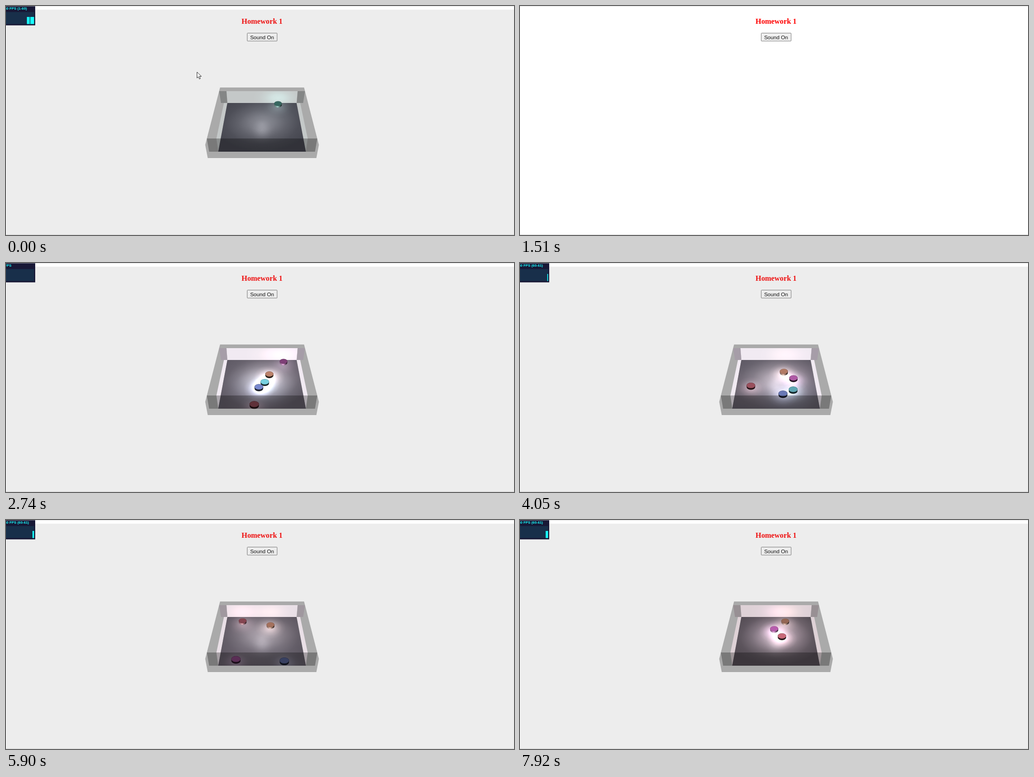
Recreate the animation shown at these times as an HTML page with a canvas. Size 1113 by 503 pixels, loop 7.99 s.

```html
<!DOCTYPE html>
<html lang="en">
<head>
<meta charset="utf-8">
<title>Homework 1</title>
<style>
  html, body { margin: 0; width: 100%; height: 100%; overflow: hidden; background: #fff; }
  canvas, svg { position: absolute; left: 0; top: 0; display: block; }
  #title { font: bold 16.3px "Liberation Serif", "Times New Roman", serif; }
  #label { font: 11.6px "Liberation Sans", Arial, sans-serif; fill: #111; }
  #fps { font: bold 7.83px "Liberation Sans", Arial, sans-serif; fill: #18fdfd; }
</style>
</head>
<body>
<canvas id="scene" width="1113" height="503"></canvas>
<svg width="1113" height="503">
  <text id="title" x="561" y="38.5" text-anchor="middle">Homework 1</text>
  <rect id="button" x="528.5" y="59.5" width="65.5" height="17.5" rx="1" stroke="#767676"/>
  <text id="label" x="561" y="72.5" text-anchor="middle">Sound On</text>
  <text id="fps" x="-3.3" y="8.4"></text>
  <path id="cursor" d="M0 0V13.2L3 10.4L5.2 15.4L7.4 14.4L5.3 9.6H9.6Z" fill="#fff" stroke="#222" stroke-width="1"/>
</svg>
<script>
const LOOP = 7990, BLANK = 1510, RELOAD = 1900;
const CX = 561, LIMIT = 0.912;
const ctx = document.getElementById('scene').getContext('2d');
const el = id => document.getElementById(id);

// Position (x, z) at time t0 on a floor of -1..1, speed in units per second.
const pucks = [
  { rgb: [95, 178, 166], t0: 0, x: 0.458, z: -0.898, vx: 0.02, vz: 0.32, from: 0, to: BLANK },
  { rgb: [215, 112, 130], t0: 2740, x: -0.18, z: 0.895, vx: -0.347, vz: -0.516, from: RELOAD, to: LOOP },
  { rgb: [218, 150, 124], t0: 2740, x: 0.195, z: -0.259, vx: 0.012, vz: -0.09, from: RELOAD, to: LOOP },
  { rgb: [218, 110, 205], t0: 2740, x: 0.613, z: -0.86, vx: 0.576, vz: 0.588, from: RELOAD, to: LOOP },
  { rgb: [125, 218, 234], t0: 2740, x: 0.07, z: 0.071, vx: 0.27, vz: 0.228, from: RELOAD, to: 5860 },
  { rgb: [136, 156, 234], t0: 2740, x: -0.08, z: 0.274, vx: 0.189, vz: 0.19, from: RELOAD, to: 6150 }
];

// Tone of floor and inner walls by number of lit pucks.
const tones = {
  1: { floor: [70, 71, 80], wall: [196, 200, 200], corner: [132, 134, 134] },
  3: { floor: [84, 76, 84], wall: [222, 209, 214], corner: [152, 144, 148] },
  4: { floor: [90, 84, 94], wall: [233, 223, 230], corner: [160, 152, 159] },
  5: { floor: [95, 90, 101], wall: [241, 234, 242], corner: [166, 157, 168] }
};

const floor = [485, 213, 636.5, 213, 657, 320, 465, 320];
const backWall = [483, 187, 639, 187, 636.5, 213, 485, 213];
const innerLeft = [483, 187, 485, 213, 465, 320, 461, 291];
const cornerLeft = [467, 187, 483, 187, 485, 213, 471, 213];
const outline = [469, 179, 653, 179, 685.5, 305, 680, 334, 442, 334, 436.5, 305];
const frontWall = [440, 291, 682, 291, 677, 320, 445, 320];

const css = (c, a = 1) => `rgba(${c.map(Math.round).join()},${a})`;
const scale = (c, k) => c.map(v => v * k);
const mix = (c, d, k) => c.map((v, i) => v + (d[i] - v) * k);
const flip = p => p.map((v, i) => i % 2 ? v : 2 * CX - v);
const clamp = v => Math.max(0, Math.min(1, v));

function fold(v) {
  const period = 4 * LIMIT;
  const u = ((v + LIMIT) % period + period) % period;
  return u < 2 * LIMIT ? u - LIMIT : 3 * LIMIT - u;
}

function trace(p) {
  ctx.beginPath();
  for (let i = 0; i < p.length; i += 2) ctx.lineTo(p[i], p[i + 1]);
  ctx.closePath();
}

function poly(p, fill) {
  trace(p);
  ctx.fillStyle = fill;
  ctx.fill();
}

function glow(x, y, rx, ry, color, alpha) {
  const g = ctx.createRadialGradient(0, 0, 0, 0, 0, 1);
  [1, 0.8, 0.4, 0.12, 0].forEach((k, i) => g.addColorStop(i / 4, css(color, alpha * k)));
  ctx.save();
  ctx.translate(x, y);
  ctx.scale(rx, ry);
  ctx.fillStyle = g;
  ctx.fillRect(-1, -1, 2, 2);
  ctx.restore();
}

// Runs draw clipped to a polygon, with light adding up.
function lit(p, draw) {
  ctx.save();
  trace(p);
  ctx.clip();
  ctx.globalCompositeOperation = 'lighter';
  draw();
  ctx.restore();
}

function place(p, t) {
  const dt = (t - p.t0) / 1000;
  const x = fold(p.x + p.vx * dt), z = fold(p.z + p.vz * dt);
  const s = 1 / (0.005915 - 0.000707 * z);
  return { rgb: p.rgb, x, z, s, r: Math.hypot(x, z),
    px: CX + x * s / 2, py: 210 + (s - 151) * 107 / 41 };
}

function drawPuck(p) {
  const rx = p.s * 0.054, ry = p.s * 0.034, h = p.s * 0.021;
  const top = scale(p.rgb, 1 - 0.42 * clamp(p.r));
  const dark = scale(p.rgb, 0.17);
  const side = ctx.createLinearGradient(p.px - rx, 0, p.px + rx, 0);
  const bright = p.z < -0.28 ? mix(p.rgb, [255, 255, 255], 0.45) : dark;
  side.addColorStop(0, css(mix(dark, bright, 0.4)));
  side.addColorStop(0.45, css(bright));
  side.addColorStop(0.95, css(dark));
  ctx.fillStyle = side;
  ctx.beginPath();
  ctx.ellipse(p.px, p.py + h, rx, ry, 0, 0, Math.PI);
  ctx.ellipse(p.px, p.py, rx, ry, 0, Math.PI, 2 * Math.PI);
  ctx.fill();
  ctx.fillStyle = css(top);
  ctx.beginPath();
  ctx.ellipse(p.px, p.py, rx, ry, 0, 0, 2 * Math.PI);
  ctx.fill();
  ctx.strokeStyle = css(scale(top, 0.7), 0.6);
  ctx.lineWidth = 0.7;
  ctx.stroke();
}

function drawBox(t) {
  const live = pucks.filter(p => t >= p.from && t < p.to)
    .map(p => place(p, t)).sort((a, b) => a.z - b.z);
  const tone = tones[live.length];

  poly(outline, '#aaa');
  poly(backWall, css(tone.wall));
  lit(backWall, () => live.forEach(p =>
    glow(p.px, 202, 55, 30, p.rgb, 0.2 * clamp(-p.z))));
  [innerLeft, flip(innerLeft)].forEach(w => poly(w, css(tone.wall)));
  [cornerLeft, flip(cornerLeft)].forEach(w => poly(w, css(tone.corner)));

  poly(floor, css(tone.floor));
  lit(floor, () => {
    glow(CX, 258, 105, 62, [255, 255, 255], 0.25);
    glow(CX, 272, 30, 32, [255, 255, 255], 0.11);
    live.forEach(p => {
      const k = 0.25 + 0.75 * Math.exp(-2 * p.r * p.r);
      const light = mix(p.rgb, [255, 255, 255], 0.5);
      glow(p.px, p.py + 6, 34, 25, light, 0.5 * k);
      glow(p.px, p.py + 8, 90, 55, light, 0.16 * k);
    });
  });

  live.forEach(drawPuck);
  poly(frontWall, 'rgba(0,0,0,.29)');
}

function drawStats(t) {
  const first = t < BLANK;
  const updates = first ? 0 : Math.max(0, Math.floor((t - 1870) / 1000));
  ctx.fillStyle = '#181836';
  ctx.fillRect(0, 0.5, 64, 42);
  ctx.fillStyle = '#182f4a';
  ctx.fillRect(0, 13.3, 61.5, 26.1);
  ctx.fillStyle = '#18fdfd';
  if (first) {
    const shift = t < 500 ? 0 : 0.87;
    ctx.fillRect(45.8 - shift, 24, 15.7 + shift, 15.6);
    ctx.fillStyle = '#182f4a';
    ctx.fillRect(50.9 - shift, 24, 0.8, 15.6);
    ctx.fillRect(53 - shift, 24, 0.8, 15.6);
  } else {
    ctx.fillRect(61.5 - 0.87 * updates, 24, 0.87 * updates, 15.6);
  }
  el('fps').textContent = first ? '60 FPS (1-60)'
    : ['FPS', '61 FPS (61-61)'][updates] || '60 FPS (60-61)';
}

function moveCursor(t) {
  const u = clamp((t - 70) / 750), k = u * u * (3 - 2 * u);
  const exit = clamp((t - 820) / 70) * 26;
  el('cursor').setAttribute('transform',
    `translate(${418.5 - 253 * k} ${145 - 139 * k - exit})`);
  el('cursor').style.visibility = t < 890 ? 'visible' : 'hidden';
}

function draw(t) {
  const blank = t >= BLANK && t < RELOAD;
  ctx.fillStyle = '#fff';
  ctx.fillRect(0, 0, 1113, 503);
  if (!blank) {
    ctx.fillStyle = '#ededed';
    ctx.fillRect(1, 8, 1112, 494);
  }
  ctx.fillStyle = '#dedede';
  ctx.fillRect(0, 0, 1113, 1);
  ctx.fillStyle = '#cfcfcf';
  ctx.fillRect(0, 502, 1113, 1);
  if (!blank) {
    drawBox(t);
    drawStats(t);
  }
  el('fps').style.visibility = blank ? 'hidden' : 'visible';
  el('title').setAttribute('fill', blank ? '#f00' : '#ee1111');
  el('button').setAttribute('fill', blank ? '#efefef' : '#ececec');
  moveCursor(t);
}

const start = performance.now();
function tick() {
  draw((performance.now() - start) % LOOP);
  requestAnimationFrame(tick);
}
tick();
</script>
</body>
</html>
```
